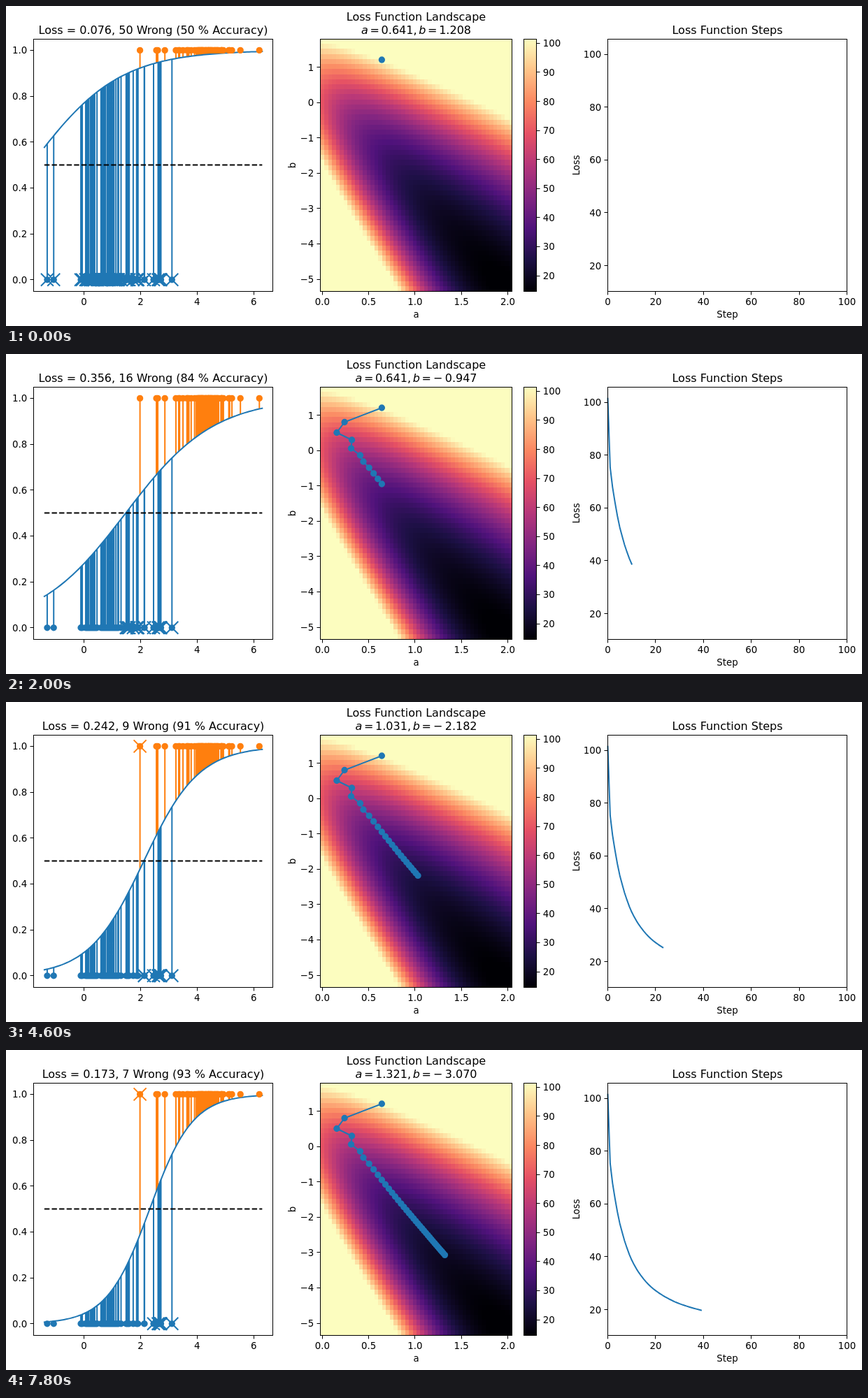
An HTML page with a canvas for the animation above (8000 ms loop, 1224 by 458 pixels).

```html
<!DOCTYPE html>
<html lang="en">
<head>
<meta charset="utf-8">
<title>Loss Function Steps</title>
<style>
  html, body { margin: 0; width: 100%; height: 100%; overflow: hidden; background: #fff; }
  canvas, svg { position: absolute; left: 0; top: 0; width: 1224px; height: 458px; }
  text { font: 13.33px "DejaVu Sans", sans-serif; fill: #000; white-space: pre; }
  text.title { font-size: 16px; }
  .line { fill: none; stroke-width: 2; stroke-linejoin: round; }
  .frame { fill: none; stroke: #000; }
</style>
</head>
<body>
<canvas id="heat" width="1224" height="458"></canvas>
<svg id="plot" viewBox="0 0 1224 458"></svg>
<script>
const BLUE = '#1f77b4', ORANGE = '#ff7f0e';
const STEP_MS = 200, STEPS = 40;
const TOP = 47.5, BOTTOM = 408.5;
const LOSS_MIN = 14.6, LOSS_MAX = 101.4;

// Sample positions in hundredths, one list per class
const zeros = [-130, -107, -11, -6, 6, 10, 12, 16, 22, 24, 28, 30, 33, 36, 38, 46, 60,
  62, 66, 70, 72, 76, 82, 84, 88, 90, 95, 99, 104, 106, 113, 120, 122, 131, 149, 152,
  156, 160, 174, 186, 189, 191, 213, 214, 246, 262, 266, 270, 272, 311].map(v => v / 100);
const ones = [198, 256, 261, 286, 325, 335, 338, 350, 364, 366, 371, 379, 391, 397, 402,
  404, 407, 409, 412, 414, 417, 418, 421, 424, 428, 431, 433, 437, 440, 441, 444, 447,
  449, 452, 455, 460, 463, 466, 470, 472, 476, 484, 487, 488, 493, 512, 515, 523, 553,
  620].map(v => v / 100);

// step, a, b, displayed loss
const keys = [
  [0, .641, 1.208, .076], [1, .239, .803, .23], [2, .155, .506, .35], [3, .318, .298, .325],
  [4, .31, .06, .385], [5, .408, -.137, .382], [6, .442, -.315, .391], [7, .504, -.489, .392],
  [10, .641, -.947, .356], [14, .785, -1.416, .31], [19, .934, -1.883, .268],
  [27, 1.118, -2.45, .219], [33, 1.227, -2.785, .194], [39, 1.321, -3.07, .173]
];

const magma = [[0, 0, 4], [28, 16, 68], [79, 18, 123], [129, 37, 129], [181, 54, 122],
  [229, 80, 100], [251, 135, 97], [254, 194, 135], [252, 253, 191]];

const scale = (d0, p0, d1, p1) => v => p0 + (v - d0) * (p1 - p0) / (d1 - d0);
const sx = scale(0, 111.5, 6, 354.2), sy = scale(0, 391.8, 1, 63.4);
const ax = scale(0, 452.4, 2, 717.5), by = scale(1, 87.5, -5, 391);
const cy = scale(LOSS_MIN, BOTTOM, LOSS_MAX, TOP);
const tx = scale(0, 860.5, 100, 1202.5), ly = scale(20, 371.5, 100, 69);

const sigmoid = z => 1 / (1 + Math.exp(-z));
const softplus = z => Math.log(1 + Math.exp(z));
const sum = (list, f) => list.reduce((t, x) => t + f(x), 0);
const totalLoss = (a, b) =>
  sum(zeros, x => softplus(a * x + b)) + sum(ones, x => softplus(-a * x - b));

// Cubic through the keys, column c, at step s
function track(s, c) {
  const i = Math.min(keys.findLastIndex(k => k[0] <= s), keys.length - 2);
  const slope = j => {
    const p = keys[Math.max(j - 1, 0)], q = keys[Math.min(j + 1, keys.length - 1)];
    return (q[c] - p[c]) / (q[0] - p[0]);
  };
  const [p, q] = [keys[i], keys[i + 1]], h = q[0] - p[0], u = (s - p[0]) / h;
  const w = u * u * (3 - 2 * u);
  return p[c] * (1 - w) + q[c] * w
    + h * (u * (1 - u) ** 2 * slope(i) - u * u * (1 - u) * slope(i + 1));
}

const states = Array.from({ length: STEPS }, (_, s) => {
  const a = track(s, 1), b = track(s, 2);
  return { a, b, shown: track(s, 3), loss: Math.min(totalLoss(a, b), LOSS_MAX) };
});

function color(loss) {
  const v = Math.max(0, Math.min(1, (loss - LOSS_MIN) / (LOSS_MAX - LOSS_MIN))) * 8;
  const i = Math.min(7, Math.floor(v));
  return `rgb(${magma[i].map((c, k) => Math.round(c + (magma[i + 1][k] - c) * (v - i)))})`;
}

function drawHeat() {
  const g = document.getElementById('heat').getContext('2d');
  const n = 50, left = 450, width = 274, top = 47, height = 361;
  const edge = (start, size, i) => Math.round(start + size * i / n);
  const ia = scale(452.4, 0, 717.5, 2), ib = scale(87.5, 1, 391, -5);
  for (let i = 0; i < n; i++) for (let j = 0; j < n; j++) {
    const x = edge(left, width, i), y = edge(top, height, j);
    g.fillStyle = color(totalLoss(ia(left + width * (i + .5) / n), ib(top + height * (j + .5) / n)));
    g.fillRect(x, y, edge(left, width, i + 1) - x, edge(top, height, j + 1) - y);
  }
  for (let y = 47; y < 409; y++) {
    g.fillStyle = color(LOSS_MAX - (y - 47) / 361 * (LOSS_MAX - LOSS_MIN));
    g.fillRect(740, y, 19, 1);
  }
}

const svg = document.getElementById('plot');
function add(tag, attrs, text = '') {
  const el = document.createElementNS('http://www.w3.org/2000/svg', tag);
  for (const k in attrs) el.setAttribute(k, attrs[k]);
  el.textContent = text;
  return svg.appendChild(el);
}
const label = (x, y, text, anchor = 'middle', more = {}) =>
  add('text', { x, y, 'text-anchor': anchor, ...more }, text);
const title = (x, y, text) => label(x, y, text, 'middle', { class: 'title' });
const line = (stroke, more = {}) => add('path', { class: 'line', stroke, ...more });
const fillPath = fill => add('path', { fill });
const num = (v, d) => v.toFixed(d).replace('-', '\u2212');

function frame(x0, x1) {
  add('rect', { class: 'frame', x: x0, y: TOP, width: x1 - x0, height: BOTTOM - TOP });
}
function xTicks(values, pos, digits) {
  for (const v of values) {
    const x = Math.floor(pos(v)) + .5;
    add('path', { class: 'frame', d: `M${x} ${BOTTOM}v5` });
    label(pos(v), 428, num(v, digits));
  }
}
function yTicks(values, pos, digits, x, side = -1) {
  for (const v of values) {
    const y = Math.floor(pos(v)) + .5;
    add('path', { class: 'frame', d: `M${x} ${y}h${5 * side}` });
    label(x + 9.3 * side, pos(v) + 5, num(v, digits), side < 0 ? 'end' : 'start');
  }
}
const sideLabel = (x, text) =>
  label(0, 0, text, 'middle', { transform: `translate(${x} 228) rotate(-90)` });

// Data layers, bottom to top
const zeroStems = line(BLUE), oneStems = line(ORANGE);
const curve = line(BLUE, { 'stroke-linecap': 'square' });
line('#000', { d: `M${sx(-1.4)} ${sy(.5)}H${sx(6.3)}`, 'stroke-dasharray': '7.4 3.2' });
const zeroDots = fillPath(BLUE), oneDots = fillPath(ORANGE);
const zeroCross = line(BLUE), oneCross = line(ORANGE);
const trail = line(BLUE), trailDots = fillPath(BLUE);
const history = line(BLUE, { 'stroke-linecap': 'square' });

frame(39.5, 381.5);
frame(449.5, 723.5);
frame(740.5, 758.5);
frame(860.5, 1202.5);
xTicks([0, 2, 4, 6], sx, 0);
yTicks([0, .2, .4, .6, .8, 1], sy, 1, 39.5);
xTicks([0, .5, 1, 1.5, 2], ax, 1);
yTicks([1, 0, -1, -2, -3, -4, -5], by, 0, 449.5);
yTicks([20, 30, 40, 50, 60, 70, 80, 90, 100], cy, 0, 758.5, 1);
xTicks([0, 20, 40, 60, 80, 100], tx, 0);
yTicks([20, 40, 60, 80, 100], ly, 0, 860.5);
label(586.5, 446, 'a');
label(1031.5, 446, 'Step');
sideLabel(413.5, 'b');
sideLabel(819.5, 'Loss');
title(586.5, 20.8, 'Loss Function Landscape');
title(1031.5, 39.5, 'Loss Function Steps');
const score = title(210.5, 39.5, '');
const params = title(586.5, 39.5, '');

const dot = (x, y) => `M${x - 4.67} ${y}a4.67 4.67 0 1 0 9.34 0a4.67 4.67 0 1 0 -9.34 0z`;
const cross = (x, y) => `M${x - 9} ${y - 9}l18 18m0 -18l-18 18`;
const poly = points => 'M' + points.map(p => p.map(v => v.toFixed(2)).join(' ')).join('L');
const setPath = (el, d) => el.setAttribute('d', d);
const dots = (el, list, y) => setPath(el, list.map(x => dot(sx(x), sy(y))).join(''));

dots(zeroDots, zeros, 0);
dots(oneDots, ones, 1);

function mathTitle(a, b) {
  const span = (text, gap = 0) => `<tspan dx="${gap}">${text}</tspan>`;
  const name = (text, gap = 0) => `<tspan dx="${gap}" font-style="italic">${text}</tspan>`;
  const sign = b < 0 ? span('\u2212', 2.7) : '';
  params.innerHTML = name('a') + span('=', 2.7) + span(a.toFixed(3), 2.7) + span(',')
    + name('b', 2.7) + span('=', 2.7) + sign
    + span(Math.abs(b).toFixed(3), b < 0 ? 3.7 : 2.7);
}

function render(step) {
  const { a, b, shown } = states[step], past = states.slice(0, step + 1);
  const p = x => sigmoid(a * x + b);
  const stems = (list, y) => list.map(x => `M${sx(x)} ${sy(y)}V${sy(p(x))}`).join('');
  const wrongZeros = zeros.filter(x => p(x) > .5), wrongOnes = ones.filter(x => p(x) <= .5);
  const crosses = (list, y) => list.map(x => cross(sx(x), sy(y))).join('');
  const wrong = wrongZeros.length + wrongOnes.length;

  setPath(zeroStems, stems(zeros, 0));
  setPath(oneStems, stems(ones, 1));
  setPath(zeroCross, crosses(wrongZeros, 0));
  setPath(oneCross, crosses(wrongOnes, 1));
  setPath(curve, poly(Array.from({ length: 101 }, (_, i) => {
    const x = -1.4 + 7.7 * i / 100;
    return [sx(x), sy(p(x))];
  })));
  setPath(trail, poly(past.map(s => [ax(s.a), by(s.b)])));
  setPath(trailDots, past.map(s => dot(ax(s.a), by(s.b))).join(''));
  setPath(history, step ? poly(past.map((s, i) => [tx(i), ly(s.loss)])) : '');
  score.textContent = `Loss = ${shown.toFixed(3)}, ${wrong} Wrong (${100 - wrong} % Accuracy)`;
  mathTitle(a, b);
}

let current = -1;
const start = performance.now();
function tick() {
  const step = Math.floor((performance.now() - start) / STEP_MS) % STEPS;
  if (step !== current) render(current = step);
  requestAnimationFrame(tick);
}
drawHeat();
tick();
</script>
</body>
</html>
```
